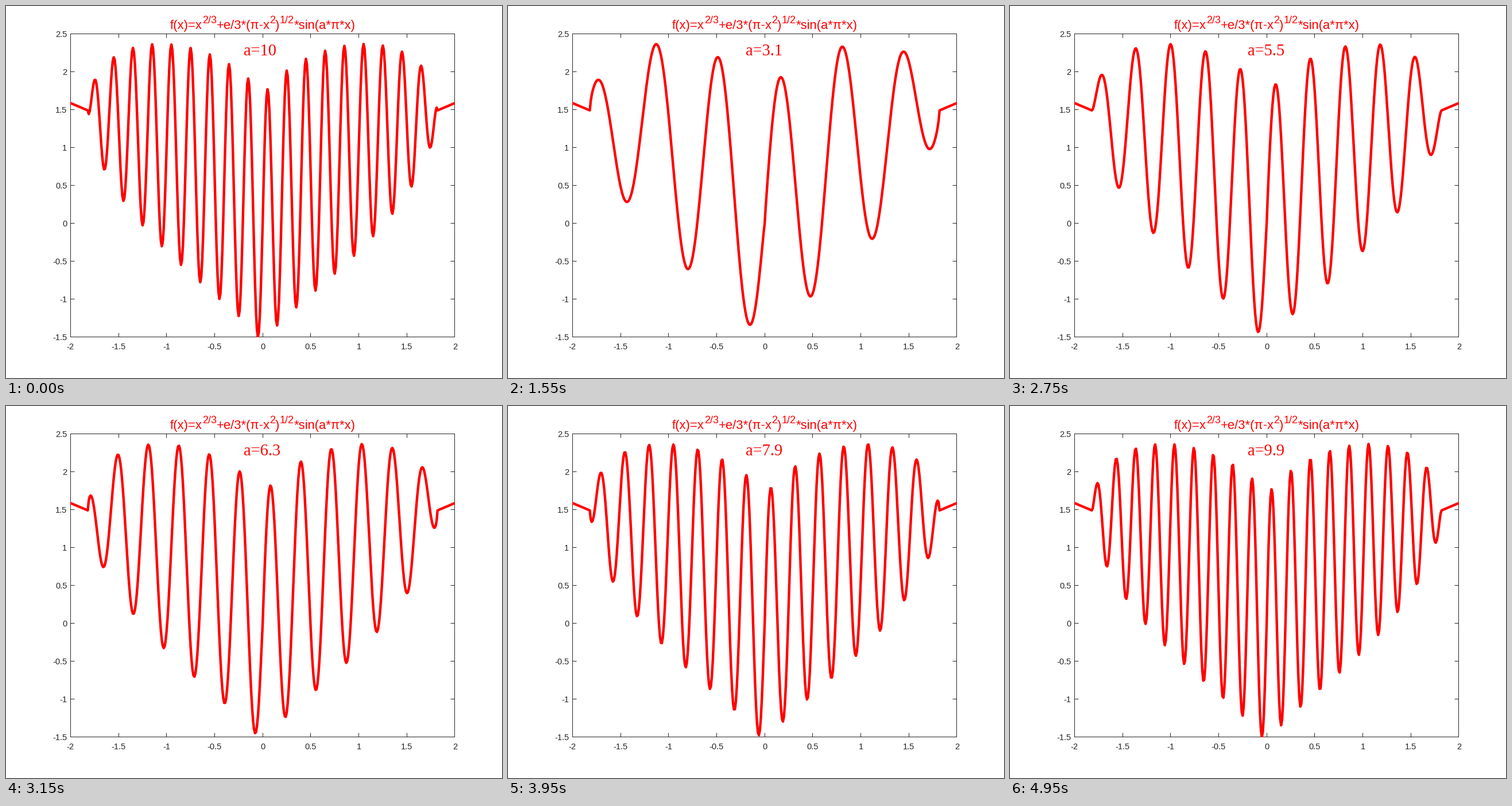
These frames come from a looping animation (864 px wide and 648 px high, 5000 ms). A matplotlib script:

```python
import numpy as np
import matplotlib.pyplot as plt
from matplotlib.animation import FuncAnimation

W, H = 864, 648
FRAMES, INTERVAL = 100, 50
RED, INK = "#ff0000", "#262626"
SANS, SERIF = "Liberation Sans", "Liberation Serif"

# Plot box in pixels, measured from the top left corner
LEFT, RIGHT, TOP, BOTTOM = 112.32, 781.92, 48.6, 576.72
XLIM, YLIM = (-2, 2), (-1.5, 2.5)

# At 72 dpi one point is one pixel
fig = plt.figure(figsize=(W / 72, H / 72), dpi=72, facecolor="white")


def add_box(shift=0):
    """Add axes over the plot box, moved up and left by shift pixels."""
    ax = fig.add_axes([(LEFT - shift) / W, 1 - (BOTTOM - shift) / H,
                       (RIGHT - LEFT) / W, (BOTTOM - TOP) / H])
    ax.set(xlim=XLIM, ylim=YLIM)
    return ax


def put(x, y, text, size, color=INK, font=SANS, ha="left"):
    """Write text with its baseline at pixel (x, y) from the top left."""
    return fig.text(x / W, 1 - y / H, text, fontsize=size, color=color,
                    family=font, ha=ha, va="baseline")


def to_px(x, y):
    return (LEFT + (x + 2) / 4 * (RIGHT - LEFT),
            BOTTOM - (y + 1.5) / 4 * (BOTTOM - TOP))


# The shift makes box and ticks snap down to whole pixels
frame = add_box(0.45)
xticks = np.arange(-2, 2.1, 0.5)
yticks = np.arange(-1.5, 2.6, 0.5)
frame.set(xticks=xticks, yticks=yticks)
frame.tick_params(direction="in", length=6.7, width=1, color=INK,
                  top=True, right=True, labelbottom=False, labelleft=False)
for spine in frame.spines.values():
    spine.set(linewidth=1, edgecolor=INK)

for v in xticks:
    put(to_px(v, 0)[0], 598, f"{v:g}", 14.67, ha="center")
for v in yticks:
    put(106.3, to_px(0, v)[1] + 5.3, f"{v:g}", 14.67, ha="right")

# Title pieces: start, text, raised
title = [
    (286, "f(x)=x", False), (342, "2/3", True),
    (367, "+e/3*(π-x", False), (459, "2", True),
    (469, ")", False), (477, "1/2", True),
    (502, "*sin(a*π*x)", False),
]
for x, text, raised in title:
    put(x, 30 if raised else 40, text, 18 if raised else 22, RED)

xs = np.arange(-200, 201) / 100
base = np.abs(xs) ** (2 / 3)
envelope = 0.9 * np.sqrt(np.clip(3.3 - xs ** 2, 0, None))

plot = add_box()
plot.axis("off")
curve, = plot.plot([], [], color=RED, lw=4.4)
label = put(413.6, 86, "", 28.5, RED, SERIF)


def draw(n):
    a = (n or FRAMES) / 10
    curve.set_data(xs, base + envelope * np.sin(a * np.pi * xs))
    label.set_text(f"a={a:g}")
    return curve, label


anim = FuncAnimation(fig, draw, frames=FRAMES, interval=INTERVAL,
                     repeat=True, repeat_delay=0)
plt.show()
```
